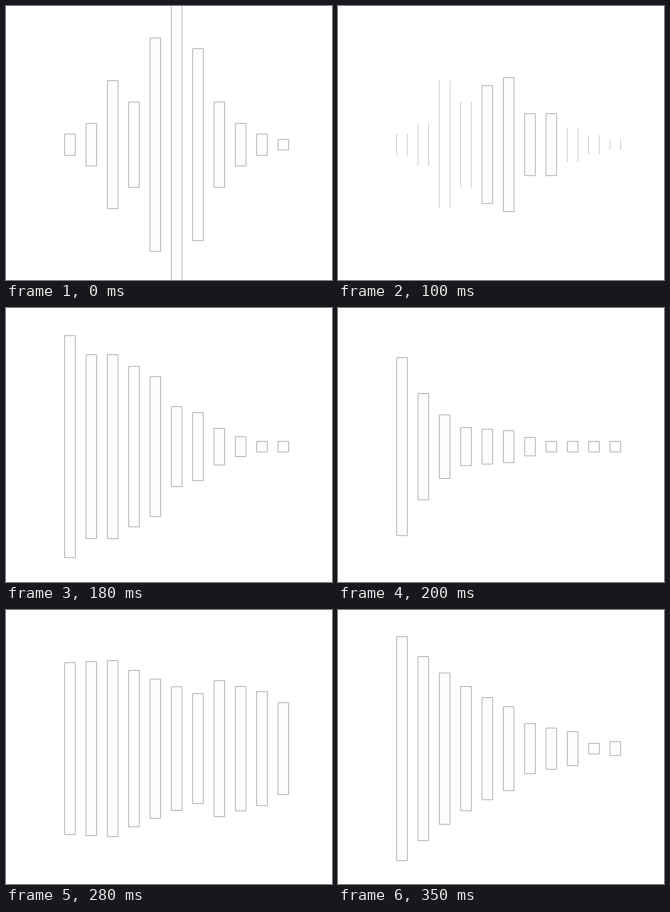
An HTML page with a canvas that plays this animation: 326x274 px, repeating every 400 ms.

```html
<!DOCTYPE html>
<html lang="en">
<head>
<meta charset="utf-8">
<title>Equalizer bars</title>
<style>
html, body { margin: 0; width: 100%; height: 100%; overflow: hidden; background: #fff; }
canvas { display: block; }
</style>
</head>
<body>
<canvas id="stage" width="326" height="274"></canvas>
<script>
const ctx = document.getElementById('stage').getContext('2d');
const LOOP = 400, STEP = 50, BARS = 11;
const CELL = 32 / 3, LINE = 2 / 3;
const LEFT = 58 + LINE, MIDDLE = 138 + LINE;
const LOW = CELL / 2; // half height of the smallest bar

// Half heights at key bars; the bars between change by a constant ratio
const rest = {
  0: CELL, 1: 2 * CELL, 2: 6 * CELL, 3: 4 * CELL, 4: 10 * CELL,
  5: 14 * CELL, 6: 9 * CELL, 7: 4 * CELL, 10: LOW
};
const started = { 4: 59, 5: 67, 6: 31, 7: 31 };
const poses = [
  rest,
  { ...rest, ...started },
  { 0: 111, 1: 92, 2: 92, 4: 70, 5: 40, 6: 34, 9: LOW },
  { 0: 89, 3: 19, 5: 16, 7: LOW },
  { 0: 86, 2: 88, 6: 55, 7: 68, 9: 57, 10: 46 },
  { 0: 99, 2: 51, 3: 59, 5: 49, 7: 22, 8: 31, 9: 16, 10: 18 },
  { 0: 112, 5: 42, 6: 25, 8: 17, 9: LOW, 10: 7 }
];

function halfHeight(keys, i) {
  const bars = Object.keys(keys).map(Number);
  const from = bars.filter(b => b <= i).pop();
  const to = bars.find(b => b > i) ?? from;
  if (to === from) return keys[from];
  return keys[from] * (keys[to] / keys[from]) ** ((i - from) / (to - from));
}

function drawBar(i, half, open) {
  const x = LEFT + 2 * CELL * i;
  const top = MIDDLE - half, bottom = MIDDLE + half;
  ctx.strokeStyle = open ? '#bbb' : '#999';
  ctx.beginPath();
  if (open) { // waiting bars show only their sides
    for (const side of [x, x + CELL]) {
      ctx.moveTo(side, top);
      ctx.lineTo(side, bottom);
    }
  } else {
    ctx.rect(x, top, CELL, bottom - top);
    ctx.fill();
  }
  ctx.stroke();
}

function draw(time) {
  // The first pose holds for two steps
  const pose = Math.max(0, Math.floor(time % LOOP / STEP) - 1);
  ctx.clearRect(0, 0, 326, 274);
  ctx.lineWidth = LINE;
  ctx.fillStyle = '#fdfdfd';
  for (let i = 0; i < BARS; i++) {
    drawBar(i, halfHeight(poses[pose], i), pose === 1 && !(i in started));
  }
}

const start = performance.now();
function tick() {
  draw(performance.now() - start);
  requestAnimationFrame(tick);
}
tick();
</script>
</body>
</html>
```
